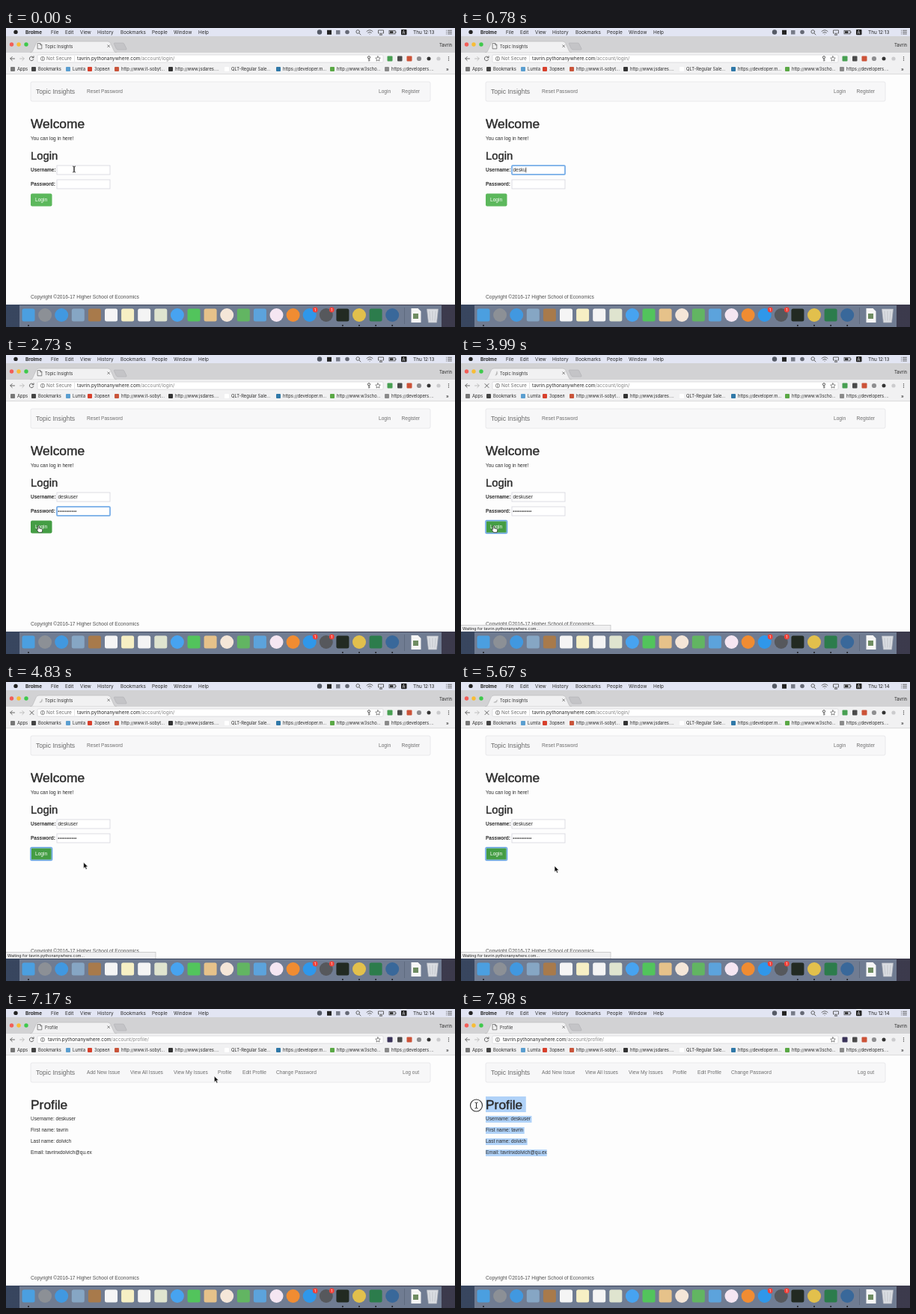
An HTML page for the animation above (8 s loop, 600 px wide and 400 px high).

```html
<!DOCTYPE html>
<html lang="en">
<head>
<meta charset="utf-8">
<title>Login walkthrough</title>
<style>
  html, body { margin: 0; width: 100%; height: 100%; overflow: hidden; background: #fdfdfd; }
  svg { display: block; width: 100%; height: 100%; }
  text { white-space: pre; fill: #2a2a2a; }
  .ui { font-family: Inter, "Noto Sans", sans-serif; }
  .page { font-family: "Liberation Sans", Arial, sans-serif; }
  .heading { stroke: #2a2a2a; stroke-width: .4; }
  .line { fill: none; stroke: #555; stroke-width: .9; stroke-linecap: round; stroke-linejoin: round; }
  #spinner { transform-origin: 45px 24px; animation: spin .8s linear infinite; }
  @keyframes spin { to { transform: rotate(360deg); } }
</style>
</head>
<body>
<svg id="stage" viewBox="0 0 600 400"></svg>
<script>
const LOOP = 8000;
const USER = 'deskuser';
const HOST = 'tavrin.pythonanywhere.com';
const APP = 'Topic Insights';
const PASSWORD_LENGTH = 11;
const INK = '#2a2a2a', GREEN = '#5cb85c', DARK_GREEN = '#449d44';

const label = family => (x, y, s, size, fill = INK, more = '', cls = '') =>
  `<text class="${family} ${cls}" x="${x}" y="${y}" font-size="${size}" style="fill:${fill}" ${more}>${s}</text>`;
const ui = label('ui');
const page = label('page');
const heading = (x, y, s, size) => page(x, y, s, size, INK, '', 'heading');
const rect = (x, y, w, h, fill, more = '') =>
  `<rect x="${x}" y="${y}" width="${w}" height="${h}" fill="${fill}" ${more}/>`;
const circle = (x, y, r, fill, more = '') =>
  `<circle cx="${x}" cy="${y}" r="${r}" fill="${fill}" ${more}/>`;
const line = (d, more = '') => `<path class="line" d="${d}" ${more}/>`;
const group = (id, ...parts) => `<g id="${id}">${parts.join('')}</g>`;
const dots = (x, y, n, pitch, r, cls) =>
  Array.from({ length: n }, (_, i) => circle(x + i * pitch, y, r, '#222', `class="${cls}"`)).join('');

function menuBar() {
  const items = [[60, 'File'], [79, 'Edit'], [99, 'View'], [122, 'History'], [153, 'Bookmarks'],
    [195, 'People'], [224, 'Window'], [257, 'Help']];
  return rect(0, 0, 600, 11, '#e2e5f3') + circle(13, 5.4, 2.7, '#222') +
    ui(26, 8, 'Brolme', 6.4, '#222', 'font-weight="700"') +
    items.map(([x, s]) => ui(x, 8, s, 6.4)).join('') +
    circle(419, 5.5, 3.2, '#555a66') + rect(429, 2.8, 6, 6, '#222') +
    rect(441, 3, 5.5, 5.5, '#777b88') + circle(456, 5.5, 2.8, '#666a76') +
    line('M472 7l2 2M472.5 5a2.3 2.3 0 1 1-4.6 0a2.3 2.3 0 1 1 4.6 0') +
    line('M482 4.5q4-3.6 8 0M483.7 6.3q2.3-2 4.6 0M486 8v.1') +
    line('M499 7h-1.5V3h7v4H503M499.5 9l1.5-2.3 1.5 2.3z') +
    rect(512, 3.3, 8, 4.6, 'none', 'stroke="#333" stroke-width=".7"') +
    rect(513, 4.2, 4.5, 2.8, '#333') + rect(520.4, 4.7, 1, 1.8, '#333') +
    rect(528, 2, 7.5, 7.2, '#222', 'rx="1"') + ui(529.6, 7.7, 'A', 5.6, '#f4f5fa') +
    ui(544, 8, 'Thu 12:13', 6.4, '#222', 'id="clock"') +
    line('M588.5 3.3h.1M590.5 3.3h5M588.5 5.6h.1M590.5 5.6h5M588.5 7.9h.1M590.5 7.9h5');
}

function browserBars() {
  const bookmarks = [
    [15, 'Apps', '#777'], [43, 'Bookmarks', '#444'], [89, 'Lumta', '#5a9ed0'],
    [118, 'Зорвел', '#d8402c'], [154, 'http://www.it-sobyt...', '#c9543a'],
    [226, 'http://www.jsdares....', '#333'], [301, 'QLT-Regular Sale...', '#fff'],
    [370, 'https://developer.m...', '#2f78a8'], [442, 'http://www.w3scho...', '#5aa845'],
    [515, 'https://developers....', '#8a8a8a']];
  return rect(0, 11, 600, 22, '#d2d2d4') +
    [[7.5, '#f25e57'], [17, '#f8bd35'], [27, '#3ec94b']].map(([x, c]) => circle(x, 22, 2.7, c)).join('') +
    '<path d="M32 33q3 0 4-3l4-9q1-3 4-3h92q3 0 4 3l4 9q1 3 4 3z" fill="#f1f1f2" stroke="#b5b5b8" stroke-width=".6"/>' +
    '<path d="M145 20h11q1.5 0 2 1.5l3 6q.5 1.5-1 1.5h-10q-2 0-2.7-1.5l-2.8-6q-.6-1.5.5-1.5z" fill="#c4c4c7" stroke="#a9a9ac" stroke-width=".5"/>' +
    group('pageIcon', line('M42.5 20.5h3.3l2 2v5.3h-5.3zM45.7 20.7v2h2', 'style="stroke-width:.7"')) +
    group('spinner', line('M45 20.7a3.3 3.3 0 0 1 3.3 3.3', 'style="stroke:#888"')) +
    ui(52, 26.5, APP, 5.7, '#333', 'id="tabTitle"') +
    line('M135.8 22.8l2.8 2.8M138.6 22.8l-2.8 2.8', 'style="stroke-width:.7"') +
    ui(579, 25, 'Tavrin', 5.9) +
    rect(0, 33, 600, 29, '#f1f1f2') + rect(0, 61.5, 600, .6, '#cacacc') +
    line('M11.5 41h-5.5M8.2 38.5l-2.5 2.5 2.5 2.5') +
    line('M18.5 41h5.5M21.8 38.5l2.5 2.5-2.5 2.5', 'style="stroke:#b8b8b8"') +
    group('reload', line('M36.6 39.5a2.8 2.8 0 1 0 .2 2.5M37 37.8v2h-2')) +
    group('stop', line('M32 38.6l5 5M37 38.6l-5 5')) +
    rect(42, 36, 462, 10, '#fff', 'rx="1.5" stroke="#cfcfd2" stroke-width=".6"') +
    circle(49, 41, 2.7, 'none', 'stroke="#666" stroke-width=".7"') + line('M49 40.8v1.5M49 39.4v.1') +
    '<text class="ui" id="url" x="54" y="43.3" font-size="6.4"></text>' +
    group('key', circle(485, 39.3, 1.6, 'none', 'stroke="#555"'), line('M485 41v3.2M485 43h1.3')) +
    line('M497 37.8l1 2.1 2.3.3-1.7 1.6.4 2.3-2-1.1-2 1.1.4-2.3-1.7-1.6 2.3-.3z', 'style="stroke-width:.7"') +
    rect(509.5, 37.5, 7, 7, '#48a052', 'id="extension" rx="1"') +
    rect(523, 37.5, 6.5, 7, '#4a4a4a', 'rx="1"') + rect(535.5, 37.5, 7, 7, '#cc5338', 'rx="1"') +
    circle(552, 41, 3.1, '#8e8e90') + circle(565, 41, 2.5, '#333') + circle(578, 41, 2.6, '#cbcbcd') +
    [38.7, 41, 43.3].map(y => circle(591.5, y, .7, '#555')).join('') +
    bookmarks.map(([x, s, c]) => rect(x - 9, 52, 6, 6, c, 'rx="1"') + ui(x, 57, s, 5.8)).join('') +
    ui(588, 57, '»', 6.5);
}

function dock() {
  const icons = [['s', '#4b9fe0'], ['c', '#8c9096'], ['c', '#4198e0'], ['s', '#86a6c4'], ['s', '#a87a4b'],
    ['s', '#f5f5f5'], ['s', '#f6efc4'], ['s', '#f4f4f4'], ['s', '#dfe4cf'], ['c', '#47a3f0'], ['s', '#52c45c'],
    ['s', '#e6c28a'], ['c', '#f4e6d8'], ['s', '#62b562'], ['s', '#5ca3dc'], ['c', '#f5e6f2'], ['c', '#f08c32'],
    ['c', '#2f97ea'], ['c', '#56585c'], ['s', '#222a22'], ['c', '#e2c04c'], ['s', '#2c7c4c'], ['c', '#39689a']];
  const at = i => 30 + i * 22.1;
  const drawIcon = ([shape, color], i) => shape === 'c'
    ? circle(at(i), 384, 9, color) : rect(at(i) - 8.5, 375.5, 17, 17, color, 'rx="2.5"');
  return rect(0, 370, 600, 30, 'url(#desk)') + rect(18, 371, 564, 29, '#707c92') +
    icons.map(drawIcon).join('') +
    [17, 18].map(i => circle(at(i) + 7.5, 377, 3.4, '#f04038') + ui(at(i) + 6.4, 379, '1', 5, '#fff')).join('') +
    [0, 19, 20, 21, 22].map(i => circle(at(i), 398, 1, '#1c1c20')).join('') +
    rect(532, 374, .7, 22, '#586378') +
    '<path d="M541.5 375h9l4 4v15h-13z" fill="#f6f6f6"/>' + rect(544, 382, 7, 7, '#6f8d62') +
    '<path d="M562.5 376h15l-2 18h-11z" fill="#dadde2" stroke="#b3b7be" stroke-width=".7"/>' +
    line('M566 379l1 12M570 379v12M574 379l-1 12', 'style="stroke:#b3b7be;stroke-width:.6"');
}

const navLink = ([x, s]) => page(x, 87, s, 6.6, '#6e6e6e');
const field = (x, y, w, h, rx) =>
  rect(x, y, w, h, '#fff', `rx="${rx}" stroke="#d4d4dc" stroke-width=".8"`);
const ring = (id, x, y, w, h) => group(id,
  rect(x, y, w, h, 'none', 'rx="1.5" stroke="#a9cdf2" stroke-width="2"'),
  rect(x, y, w, h, 'none', 'rx="1" stroke="#5a9ae0" stroke-width=".9"'));

function loginPage() {
  return group('login',
    [[108, 'Reset Password'], [498, 'Login'], [528.5, 'Register']].map(navLink).join(''),
    heading(33, 134, 'Welcome', 17.4), page(33, 149.5, 'You can log in here!', 6.5),
    heading(33, 176, 'Login', 14.8),
    page(33, 192.3, 'Username:', 6.5, INK, 'font-weight="700"'),
    page(33, 211.3, 'Password:', 6.5, INK, 'font-weight="700"'),
    field(68, 184, 71, 12, 0), field(68, 203, 71, 12, 0),
    ring('userFocus', 68, 184, 71, 12), ring('passFocus', 68, 203, 71, 12),
    page(69.5, 192.3, '', 6.5, INK, 'id="typed"'), dots(70.3, 209, PASSWORD_LENGTH, 2.3, .85, 'secret'),
    rect(0, 0, .7, 7, '#222', 'id="caret"'),
    rect(33, 221.5, 28.5, 17, GREEN, 'id="loginButton" rx="2"'),
    ring('buttonFocus', 33, 221.5, 28.5, 17),
    page(39, 232.3, 'Login', 6.6, '#fff'));
}

const memberLinks = [[108, 'Add New Issue'], [166, 'View All Issues'], [224, 'View My Issues'],
  [283, 'Profile'], [316, 'Edit Profile'], [361, 'Change Password'], [530, 'Log out']];

const profileRows = [
  { y: 134, top: 117, bottom: 138, pad: 4.5, s: 'Profile' },
  { y: 149.3, top: 143, bottom: 152, pad: 1.5, s: 'Username: ' + USER },
  { y: 164.3, top: 158, bottom: 167, pad: 1.5, s: 'First name: tavrin' },
  { y: 179.3, top: 173, bottom: 182, pad: 1.5, s: 'Last name: dolvich' },
  { y: 194.3, top: 188, bottom: 197, pad: 0, s: 'Email: tavrinxdolvich@qu.ex' }];

function memberPages() {
  return group('member', memberLinks.map(navLink).join('')) +
    group('add',
      heading(40, 131, 'Add New ' + APP, 14.5),
      field(40, 139, 342, 17, 2), page(46, 150, 'Name your analysis somehow', 6.6, '#8e8e8e'),
      field(40, 166, 342, 17, 2), page(46, 177, 'Your analysis goes here', 6.6, '#8e8e8e'),
      rect(40, 193, 33, 17, GREEN, 'rx="2"'), page(46, 204, 'Submit', 6.6, '#fff')) +
    group('profile', profileRows.map((r, i) =>
      rect(33, r.top, 0, r.bottom - r.top, '#b0d2f8', 'class="mark"') +
      (i ? page(33, r.y, r.s, 6.5) : heading(33, r.y, r.s, 17.4))).join(''));
}

function savePrompt() {
  const button = (x, w, s) =>
    rect(x, 105, w, 10, '#fcfcfc', 'rx="1" stroke="#dcdcdf" stroke-width=".6"') + ui(x + 2.7, 112, s, 5.2);
  return group('prompt',
    '<path d="M324 49h157l4-4 4 4h6q1 0 1 1v74q0 1-1 1H324q-1 0-1-1V50q0-1 1-1z" fill="#fff" stroke="#c2c2c4" stroke-width=".6" filter="url(#shadow)"/>',
    '<text class="ui" x="331" y="63.5" font-size="6.1">Do you want <tspan fill="#2f7fc4">Zandel Quick Safe</tspan> to save your</text>',
    ui(331, 72, 'password for this site?', 6.1), ui(331, 90.5, USER, 5.6),
    dots(409.5, 88.4, PASSWORD_LENGTH, 3.4, 1.3, ''),
    button(440, 20, 'Never'), button(468, 18.5, 'Save'),
    circle(490, 55.5, 3.7, '#333'),
    line('M488.5 54l3 3M491.5 54l-3 3', 'style="stroke:#fff"'));
}

function pointer() {
  return group('cursor',
    circle(0, 0, 8, 'none', 'id="press" stroke="#333" stroke-width="1.1"'),
    group('ibeam', line('M-1.6-4q1.6 0 1.6 1v6q0 1-1.6 1M1.6-4q-1.6 0-1.6 1v6q0 1 1.6 1', 'style="stroke:#222"')),
    group('arrow', '<path d="M0-4v8.2l1.9-1.7 1.3 3 1.5-.6-1.3-3h2.5z" fill="#111" stroke="#fff" stroke-width=".6"/>'),
    group('hand', '<path d="M-1.8-3.2q.8-.7 1.5 0v3l3.5.7q1.2.4 1 1.8l-.6 3H-1L-3.4 1.8q-.2-1.2 1-.9l.6.5z" fill="#fff" stroke="#222" stroke-width=".7"/>'));
}

document.getElementById('stage').innerHTML = `
  <defs>
    <linearGradient id="desk"><stop offset="0" stop-color="#38465f"/><stop offset="1" stop-color="#3c3a4c"/></linearGradient>
    <filter id="shadow"><feDropShadow dx="0" dy="1.5" stdDeviation="1.8" flood-color="#333" flood-opacity=".45"/></filter>
  </defs>` +
  rect(0, 0, 600, 400, '#fdfdfd') +
  rect(33, 72, 534, 26, '#f7f7f8', 'rx="2" stroke="#e5e5e8" stroke-width=".8"') +
  page(40, 88, APP, 8.6, '#6a6a6a') +
  loginPage() + memberPages() +
  page(33, 362.3, 'Copyright ©2016-17 Higher School of Economics', 6.65, '#505050') +
  group('status', rect(-1, 361.5, 201, 9, '#f0f0f1', 'stroke="#bcbcbf" stroke-width=".7"'),
    ui(2, 368, `Waiting for ${HOST}...`, 5.3)) +
  menuBar() + browserBars() + dock() + savePrompt() + pointer();

const byId = {};
document.querySelectorAll('[id]').forEach(el => byId[el.id] = el);
const secrets = [...document.querySelectorAll('.secret')];
const marks = [...document.querySelectorAll('.mark')];
const rows = [...document.querySelectorAll('#profile text')];

const show = (id, on) => byId[id].style.display = on ? '' : 'none';
const within = (t, a, b) => t >= a && t < b;
const typedCount = (t, start, step, max) => Math.max(0, Math.min(max, Math.floor((t - start) / step) + 1));

// time, x, y
const path = [[0, 91, 189], [2400, 91, 189], [2650, 44.5, 232], [4500, 44.5, 232], [5000, 125, 250],
  [6030, 125, 250], [6370, 492, 61], [6620, 492, 61], [6900, 291, 86], [7130, 291, 86],
  [7380, 114, 193], [7450, 114, 193], [7800, 20.5, 129], [LOOP, 20.5, 129]];
const presses = [[300, 400], [2980, 3080], [6500, 6590], [7000, 7090], [7440, LOOP]];

function cursorAt(t) {
  const i = path.findIndex(p => p[0] > t);
  const [t0, x0, y0] = path[i - 1], [t1, x1, y1] = path[i];
  const k = (t - t0) / (t1 - t0), e = k * k * (3 - 2 * k);
  return [x0 + (x1 - x0) * e, y0 + (y1 - y0) * e];
}

function drawBrowser(t, onLogin, onProfile, loading) {
  show('spinner', loading);
  show('pageIcon', !loading);
  show('stop', loading);
  show('reload', !loading);
  show('status', loading);
  show('key', !onProfile);
  show('prompt', within(t, 6080, 6570));
  byId.extension.setAttribute('fill', onProfile ? '#3a3358' : '#48a052');
  byId.clock.textContent = t < 4860 ? 'Thu 12:13' : 'Thu 12:14';
  byId.tabTitle.textContent = onProfile ? 'Profile' : APP;
  const route = onLogin ? '/account/login/' : onProfile ? '/account/profile/' : '/home/add';
  const notice = '<tspan fill="#6c6c6c">Not Secure</tspan><tspan dx="3" fill="#c4c4c4">|</tspan>';
  byId.url.setAttribute('x', onLogin ? 54 : 56);
  byId.url.innerHTML = `${onLogin ? notice : ''}<tspan dx="${onLogin ? 2 : 0}">${HOST}</tspan><tspan fill="#858585">${route}</tspan>`;
}

function drawLogin(t, overButton, loading) {
  const letters = typedCount(t, 480, 75, USER.length);
  const secretCount = typedCount(t, 1350, 100, PASSWORD_LENGTH);
  const inUser = within(t, 320, 1180), inPass = within(t, 1180, 3000);
  byId.typed.textContent = USER.slice(0, letters);
  secrets.forEach((dot, i) => dot.style.display = i < secretCount ? '' : 'none');
  show('userFocus', inUser);
  show('passFocus', inPass);
  show('buttonFocus', loading);
  byId.loginButton.setAttribute('fill', overButton || loading ? DARK_GREEN : GREEN);
  show('caret', inUser || inPass && t < 2600);
  byId.caret.setAttribute('x', inUser ? 70 + letters * 3.3 : 69.7 + secretCount * 2.3);
  byId.caret.setAttribute('y', inUser ? 186.5 : 205.5);
}

function drawSelection(t, x, y) {
  profileRows.forEach((r, i) => {
    const end = 33 + rows[i].getComputedTextLength() + r.pad;
    const start = y < r.top ? 33 : Math.max(33, x);
    const selected = t >= 7450 && y < r.bottom;
    marks[i].setAttribute('x', start);
    marks[i].setAttribute('width', selected ? Math.max(0, end - start) : 0);
  });
}

function drawCursor(t, x, y, overButton) {
  const hand = overButton || within(t, 6870, 7160);
  const ibeam = !hand && (t < 2440 || t > 7330);
  show('cursor', !within(t, 480, 2400));
  show('hand', hand);
  show('ibeam', ibeam);
  show('arrow', !hand && !ibeam);
  show('press', presses.some(([a, b]) => within(t, a, b)));
  byId.cursor.setAttribute('transform', `translate(${x} ${y})`);
}

function draw() {
  const t = performance.now() % LOOP;
  const [x, y] = cursorAt(t);
  const onLogin = t < 5980, onProfile = t >= 7120, loading = within(t, 3050, 5980);
  const overButton = onLogin && t > 2400 && within(x, 33, 62) && within(y, 221, 239);
  show('login', onLogin);
  show('member', !onLogin);
  show('add', !onLogin && !onProfile);
  show('profile', onProfile);
  drawBrowser(t, onLogin, onProfile, loading);
  drawLogin(t, overButton, loading);
  if (onProfile) drawSelection(t, x, y);
  drawCursor(t, x, y, overButton);
  requestAnimationFrame(draw);
}
draw();
</script>
</body>
</html>
```
